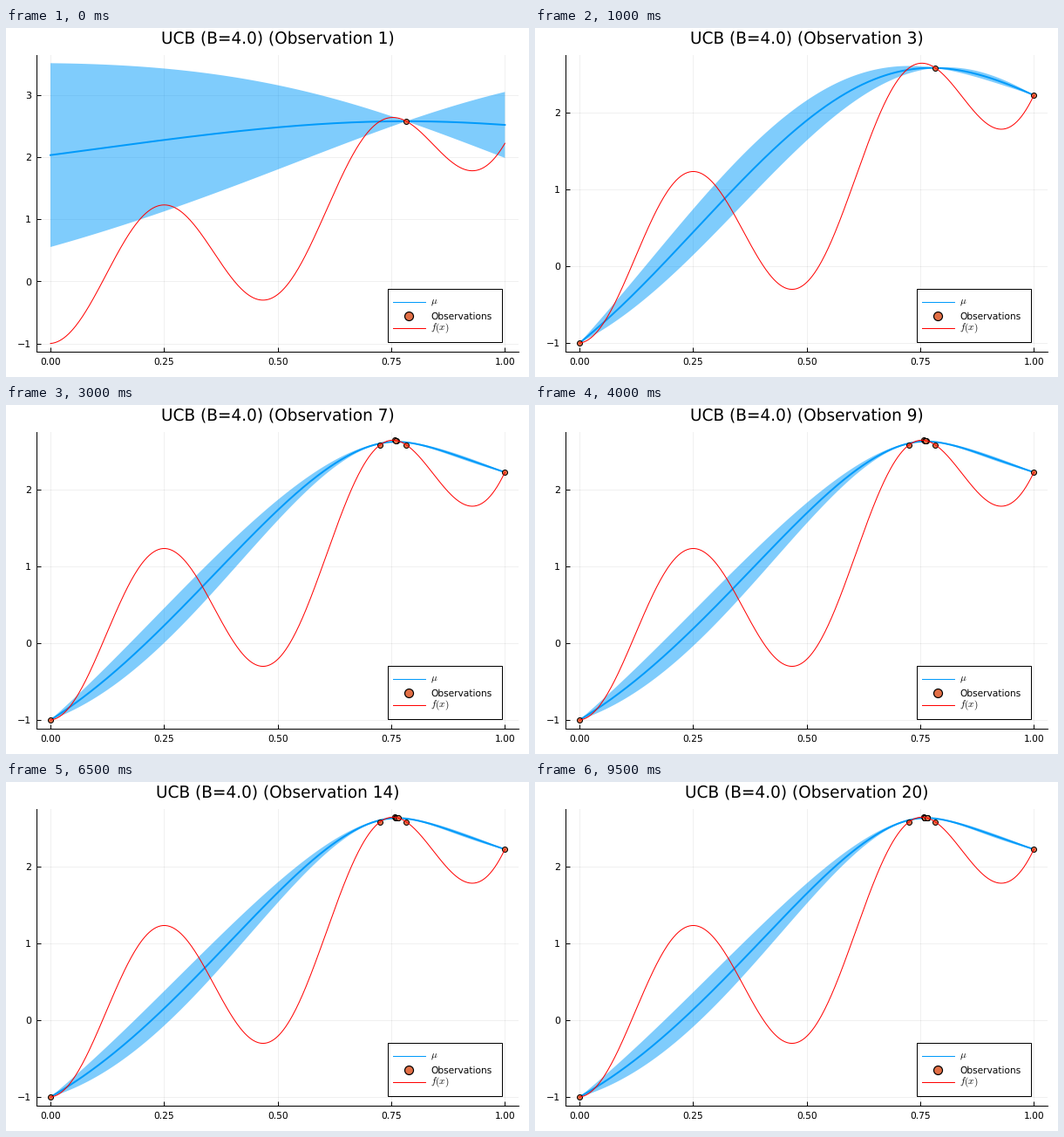
A matplotlib script that plays this animation: 600 px wide and 400 px high, repeating every 10 s.

```python
import numpy as np
import matplotlib.pyplot as plt
from matplotlib.animation import FuncAnimation

W, H, DPI = 600, 400, 100
PX = 72 / DPI  # points per pixel
LEFT, RIGHT, TOP, BOTTOM = 35.4, 588, 30.7, 371.2
BLUE, ORANGE, RED = "#009afa", "#e26f46", "#ff0000"
PRIOR_MEAN, NOISE, BAND = 1.0, 1e-5, 1.96

plt.rcParams.update({"font.family": "DejaVu Sans", "mathtext.fontset": "cm",
                     "text.hinting": "none"})


def objective(x):
    return 3 * x**2 + 1.18 * x * (x - 0.665) ** 2 - np.cos(13 * x)


def kernel(a, b):
    """Matern 5/2 with unit scale."""
    r = np.sqrt(5) * np.abs(a[:, None] - b[None, :])
    return (1 + r + r**2 / 3) * np.exp(-r)


def posterior(xs, seen):
    gram = kernel(seen, seen) + NOISE * np.eye(len(seen))
    cross = kernel(seen, xs)
    weights = np.linalg.solve(gram, cross)
    mean = PRIOR_MEAN + weights.T @ (objective(seen) - PRIOR_MEAN)
    var = 1 - np.sum(cross * weights, axis=0)
    return mean, BAND * np.sqrt(np.maximum(var, 0))


samples = np.array([
    0.783, 0.0, 1.0, 0.725, 0.7572, 0.7620, 0.7595, 0.7625, 0.7610, 0.7635,
    0.7600, 0.7640, 0.7605, 0.7645, 0.7590, 0.7650, 0.7615, 0.7655, 0.7600,
    0.7650])
xs = np.linspace(0, 1, 401)
truth = objective(xs)

fig = plt.figure(figsize=(W / DPI, H / DPI), dpi=DPI, facecolor="white")
ax = fig.add_axes([LEFT / W, 1 - BOTTOM / H,
                   (RIGHT - LEFT) / W, (BOTTOM - TOP) / H])
ax.set_xlim(-0.03, 1.03)
ax.set_xticks(np.linspace(0, 1, 5))
ax.xaxis.set_major_formatter("{x:.2f}")
ax.spines[["top", "right"]].set_visible(False)
for spine in ax.spines.values():
    spine.set_linewidth(PX)
ax.tick_params(direction="in", length=5 * PX, width=PX,
               labelsize=10.67 * PX, pad=6.5 * PX)
ax.tick_params(axis="y", labelsize=11 * PX)
ax.grid(color="black", alpha=0.06, linewidth=PX)
ax.set_axisbelow(True)

ribbon, = ax.fill([0, 1, 1], [0, 0, 1], color=BLUE, alpha=0.5, linewidth=0,
                  zorder=2)
mean_line, = ax.plot([], [], color=BLUE, linewidth=2 * PX, zorder=3)
dots, = ax.plot([], [], "o", color=ORANGE, markersize=6 * PX,
                markeredgecolor="black", markeredgewidth=PX, zorder=4,
                clip_on=False)
ax.plot(xs, truth, color=RED, linewidth=PX, zorder=5)

# Overlay in pixel coordinates for the title and legend
over = fig.add_axes([0, 0, 1, 1], facecolor="none")
over.set(xlim=(0, W), ylim=(H, 0))
over.axis("off")
title = over.text(312, 17, "", fontsize=18.55 * PX, ha="center",
                  va="baseline")
over.add_patch(plt.Rectangle((438, 299), 131, 61, facecolor="white",
                             edgecolor="black", linewidth=PX))
for y, color in ((314, BLUE), (344, RED)):
    over.plot([444, 480.5], [y, y], color=color, linewidth=PX)
over.plot(462.3, 329.6, "o", color=ORANGE, markersize=10 * PX,
          markeredgecolor="black", markeredgewidth=1.2 * PX)
for y, label, size in ((316.2, r"$\mu$", 11.2), (334, "Observations", 10.67),
                       (347.7, "$f(x)$", 11.2)):
    over.text(487, y, label, fontsize=size * PX, va="baseline")


def update(step):
    seen = samples[:step + 1]
    mean, spread = posterior(xs, seen)
    low, high = mean - spread, mean + spread
    ribbon.set_xy(np.column_stack([np.r_[xs, xs[::-1]],
                                   np.r_[high, low[::-1]]]))
    mean_line.set_data(xs, mean)
    dots.set_data(seen, objective(seen))

    bottom = min(low.min(), truth.min())
    top = max(high.max(), truth.max())
    pad = 0.03 * (top - bottom)
    ticks = np.arange(np.ceil(bottom - pad), np.floor(top + pad) + 1)
    ax.set_ylim(bottom - pad, top + pad)
    ax.set_yticks(ticks, [f"{t:.0f}".replace("-", "\u2212") for t in ticks])
    title.set_text(f"UCB (B=4.0) (Observation {step + 1})")
    return ribbon, mean_line, dots, title


anim = FuncAnimation(fig, update, frames=20, interval=500, repeat=True,
                     repeat_delay=0, blit=False)
plt.show()
```
